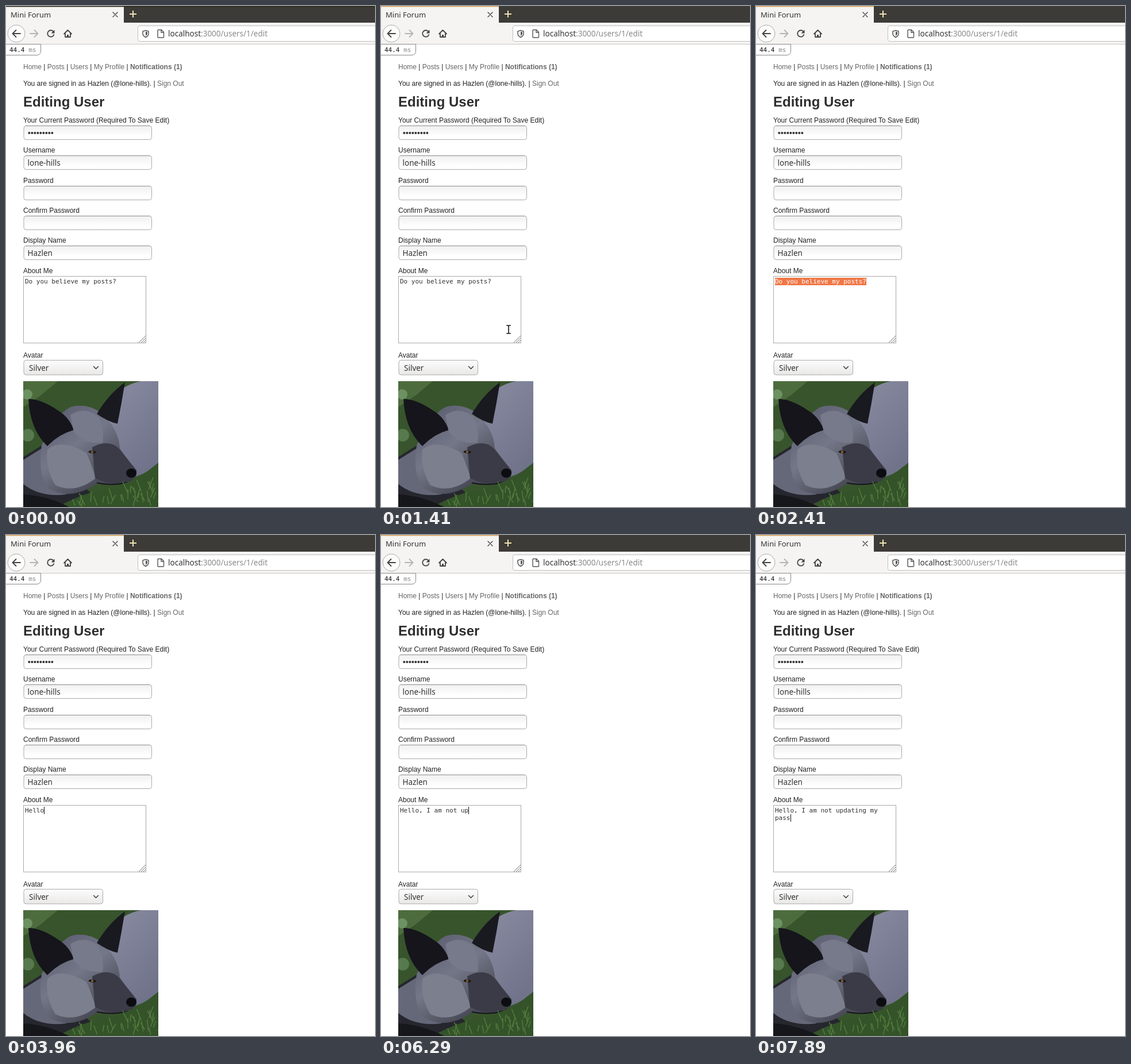
Animation, 642 px wide and 872 px high, one loop 8000 ms. Source, as an HTML page:

```html
<!DOCTYPE html>
<html lang="en">
<head>
<meta charset="utf-8">
<title>Mini Forum</title>
<style>
html, body { margin: 0; width: 100%; height: 100%; overflow: hidden; background: #fff; }
svg { display: block; width: 642px; height: 872px; }
text { white-space: pre; }
.ui { font-family: "Noto Sans", "Open Sans", sans-serif; font-size: 13.5px; fill: #333; }
.page { font-family: "Liberation Sans", Arial, sans-serif; font-size: 12px; fill: #222; }
.mono { font-family: "DejaVu Sans Mono", monospace; font-size: 11px; fill: #333; }
.link { fill: #666; }
.icon { fill: none; stroke: #444; stroke-width: 1.8; stroke-linecap: round; stroke-linejoin: round; }
</style>
</head>
<body>
<svg viewBox="0 0 642 872" xmlns="http://www.w3.org/2000/svg">
<defs>
  <linearGradient id="field" x2="0" y2="1"><stop stop-color="#f0f0f0"/><stop offset=".75" stop-color="#fff"/></linearGradient>
  <linearGradient id="button" x2="0" y2="1"><stop stop-color="#fdfdfd"/><stop offset="1" stop-color="#e9e8e7"/></linearGradient>
  <linearGradient id="body" x2=".6" y2="1"><stop stop-color="#8a8da2"/><stop offset="1" stop-color="#70738a"/></linearGradient>
  <linearGradient id="head" x2=".8" y2="1"><stop stop-color="#55576a"/><stop offset=".45" stop-color="#747788"/><stop offset="1" stop-color="#34353f"/></linearGradient>
  <clipPath id="photo"><path d="M30 653H265V872H30Z"/></clipPath>
</defs>
<rect width="642" height="872" fill="#fff"/>

<!-- browser chrome -->
<rect width="642" height="29" fill="#3c3b37"/>
<rect y="29" width="642" height="37" fill="#f5f4f2"/>
<rect width="205" height="30" fill="#f5f4f2"/>
<rect id="stripe" height="1.500"/>
<path d="M0 66.500H642" stroke="#c9c7c5"/>
<text class="ui" x="8" y="19.500" style="font-size:13px">Mini Forum</text>
<path class="icon" d="M186 11l8 8m0-8l-8 8" style="stroke-width:1.400"/>
<path d="M215 14h12m-6-6v12" stroke="#f3e3b5" stroke-width="2"/>
<circle cx="18" cy="48" r="15" fill="#fcfcfb" stroke="#aaa"/>
<path class="icon" d="M25 48H12m5.500-6L11.500 48l6 6"/>
<path class="icon" d="M42 48h13m-5.500-6l6 6l-6 6" style="stroke:#b5b4b2"/>
<path class="icon" d="M82.500 44.500A5.700 5.700 0 1 0 83.300 50"/>
<path d="M84.500 41.500v6h-6z" fill="#444"/>
<path class="icon" d="M101 48.500l6.500-6.500l6.500 6.500M103 47.500v6.500h9v-6.500"/>
<path d="M106 50h3v4h-3z" fill="#444"/>
<rect x="229.500" y="34.500" width="420" height="27" rx="3" fill="#fff" stroke="#c0bebc"/>
<path d="M243 42.500l5 1.500v4q0 4-5 6.500q-5-2.500-5-6.500v-4z" fill="none" stroke="#555" stroke-width="1.500"/>
<path d="M243 44.500v7.500q3-2 3-4v-2.500z" fill="#555"/>
<path d="M265 41.500h5.500l4 4v8.500q0 1-1 1h-8.500q-1 0-1-1v-11.500q0-1 1-1zM270 42v4h4.500" fill="none" stroke="#555" stroke-width="1.400"/>
<text class="ui" x="282" y="53">localhost<tspan fill="#8a8a8a">:3000/users/1/edit</tspan></text>

<!-- page -->
<path d="M0 66.500H60.500V78q0 7.500-7.500 7.500H0" fill="#fff" stroke="#888"/>
<text class="mono" x="6" y="80" style="fill:#111">44.4 <tspan fill="#888">ms</tspan></text>
<text class="page" x="30" y="110"><tspan class="link">Home</tspan> | <tspan class="link">Posts</tspan> | <tspan class="link">Users</tspan> | <tspan class="link">My Profile</tspan> | <tspan class="link" font-weight="bold">Notifications (1)</tspan></text>
<text class="page" x="30" y="139">You are signed in as Hazlen (@lone-hills). | <tspan class="link">Sign Out</tspan></text>
<text class="page" x="30" y="175" style="font-size:24px;font-weight:bold;fill:#2e2e2e">Editing User</text>
<g id="form"></g>
<text class="page" x="30" y="465">About Me</text>
<rect x="30.500" y="470.500" width="213" height="116" fill="#fff" stroke="#aaa"/>
<path d="M231 586l12-12M235 586l8-8M239 586l4-4" stroke="#777"/>
<rect id="mark" x="33" y="473" width="159" height="13" fill="#f07746"/>
<text class="mono" id="line0" x="33" y="483"></text>
<text class="mono" id="line1" x="33" y="496"></text>
<rect id="caret" width="1" height="13" fill="#111"/>
<text class="page" x="30" y="612">Avatar</text>
<rect x="31" y="616.500" width="137.500" height="25.500" rx="4" fill="url(#button)" stroke="#aaa"/>
<text class="ui" x="40" y="634.500">Silver</text>
<path class="icon" d="M152.500 627.500l4 4l4-4" style="stroke-width:1.600"/>

<!-- fox picture in flat shapes -->
<g clip-path="url(#photo)">
  <rect x="30" y="653" width="235" height="219" fill="#38542c"/>
  <path d="M30 653h60l-30 25l-30 20z" fill="#4d6c3d"/>
  <circle cx="37" cy="676" r="9" fill="#6c9162"/>
  <circle cx="38" cy="747" r="11" fill="#57794e"/>
  <path d="M172 690Q205 658 235 653H265V795Q244 815 222 820L185 800Z" fill="url(#body)"/>
  <path d="M30 785L62 765L150 850L110 872H30Z" fill="#25262e"/>
  <path d="M30 790L75 762L120 800L105 850Q60 856 30 832Z" fill="#656878"/>
  <path d="M62 765Q82 715 112 698Q140 690 165 708Q196 735 198 770Q215 795 227 810Q228 824 210 829Q180 835 158 832Q110 862 75 840Q54 815 62 765Z" fill="url(#head)"/>
  <path d="M72 772Q95 752 140 778Q150 800 156 822Q120 850 86 834Q68 806 72 772Z" fill="#7c7f8e"/>
  <path d="M150 768Q180 752 198 772L227 808Q228 825 208 830Q180 834 155 822Z" fill="#3a3b46"/>
  <path d="M39 684Q62 684 92 705Q110 716 118 738Q92 745 72 766Q42 738 39 684Z" fill="#15151b"/>
  <path d="M207 655Q201 692 194 727Q178 724 158 710Q178 676 207 655Z" fill="#191920"/>
  <path d="M112 712Q135 696 160 714Q172 735 168 760Q140 764 118 742Z" fill="#777a8a"/>
  <path d="M143 776q7-6 14 1q-7 4-14-1z" fill="#0e0e12"/>
  <circle cx="150" cy="776" r="2.500" fill="#76562f"/>
  <ellipse cx="218" cy="813" rx="9" ry="8" fill="#0d0d11"/>
  <path d="M158 830Q185 836 212 829" fill="none" stroke="#15151a" stroke-width="2"/>
  <path d="M90 872Q135 846 180 840L230 822L265 795V872Z" fill="#345329"/>
  <path d="M30 850Q70 852 110 872H30Z" fill="#15171a"/>
  <path id="grass" fill="none" stroke="#527b3d" stroke-width="1.500"/>
</g>

<g id="beam" fill="none" stroke-linecap="square">
  <path d="M-3-7h2l1 1l1-1h2M0-6V6M-3 7h2l1-1l1 1h2" stroke="#fff" stroke-width="4"/>
  <path d="M-3-7h2l1 1l1-1h2M0-6V6M-3 7h2l1-1l1 1h2" stroke="#111" stroke-width="1.600"/>
</g>
<path id="arrow" d="M0 0V15l3.500-3.500l2.500 5.500l2.500-1l-2.500-5.500h5z" fill="#111" stroke="#fff"/>
</svg>
<script>
const el = id => document.getElementById(id);
const show = (node, on) => node.setAttribute("visibility", on ? "visible" : "hidden");

const fields = [
  ["Your Current Password (Required To Save Edit)", "*"],
  ["Username", "lone-hills"],
  ["Password", ""],
  ["Confirm Password", ""],
  ["Display Name", "Hazlen"]
];
const dots = y => Array.from({ length: 9 }, (_, i) =>
  `<circle cx="${40.3 + i * 5}" cy="${y}" r="2" fill="#333"/>`).join("");
el("form").innerHTML = fields.map(([label, value], i) => {
  const y = Math.round(203 + i * 52.35);
  return `<text class="page" x="30" y="${y}">${label}</text>
    <rect x="31" y="${y + 5.5}" width="222.500" height="24" rx="4" fill="url(#field)" stroke="#aaa"/>
    <path d="M34 ${y + 5.5}H250" stroke="#8c8c8c"/>` +
    (value === "*" ? dots(y + 18) : `<text class="ui" x="37.500" y="${y + 23}">${value}</text>`);
}).join("");

let seed = 7;
const rand = () => (seed = seed * 16807 % 2147483647) / 2147483647;
el("grass").setAttribute("d", Array.from({ length: 34 }, () => {
  const x = 120 + rand() * 145;
  return `M${x} ${872 - rand() * (x - 110) * 0.25}l${rand() * 20 - 10} ${-8 - rand() * 14}`;
}).join(""));

const LOOP = 8000, FOCUS = 810, CLICK = 1790, SELECT = 1970, TYPE = 3070;
const before = "Do you believe my posts?";
const after = "Hello, I am not updating my pass";
// one time per character of the new text
const keys = [3070, 3220, 3540, 3740, 3960, 4770, 4860, 5110, 5190, 5270, 5350, 5430,
  5590, 5780, 5855, 5930, 6110, 6290, 6390, 6490, 6600, 6700, 6880, 6930, 7040, 7090,
  7310, 7350, 7550, 7660, 7840, 7890];
const moves = [
  [[810, 628, 150], [980, 207, 401], [1040, 207, 401], [1250, 196, 632], [1500, 237, 525], [1630, 237, 525], [1790, 62, 490], [1830, 62, 490]],
  [[2280, 66, 490], [2340, 300, 472], [2410, 614, 494]]
];

function typed(t) {
  if (t < TYPE) return before;
  const text = after.slice(0, keys.filter(k => k <= t).length);
  return t >= 4150 && t < 4540 ? text + " " : text; // stray space, then removed
}

function wrap(text) {
  if (text.length <= 31) return [text, ""];
  const cut = text.lastIndexOf(" ");
  return [text.slice(0, cut), text.slice(cut + 1)];
}

function pointer(t) {
  const path = moves.find(m => t >= m[0][0] && t < m[m.length - 1][0]);
  if (!path) return null;
  const i = path.findIndex(p => p[0] > t);
  const [a, b] = [path[i - 1], path[i]], u = (t - a[0]) / (b[0] - a[0]);
  return [1, 2].map(k => a[k] + (b[k] - a[k]) * u);
}

function draw(t) {
  const focused = t >= FOCUS;
  el("stripe").setAttribute("fill", focused ? "#d9a35f" : "#2a2818");
  el("stripe").setAttribute("width", focused ? 205 : 642);

  const selected = t >= SELECT && t < TYPE;
  const [first, second] = wrap(typed(t));
  el("line0").textContent = first;
  el("line1").textContent = second;
  el("line0").style.fill = selected ? "#fff" : "";
  show(el("mark"), selected);

  const column = (second || first).length;
  el("caret").setAttribute("x", Math.round(33.2 + column * 6.62));
  el("caret").setAttribute("y", second ? 486 : 473);
  show(el("caret"), t >= CLICK && !selected && !(t >= 4150 && t < 4320));

  const at = pointer(t);
  const beam = at && at[0] < 254 && at[1] < 600;
  show(el("beam"), beam);
  show(el("arrow"), at && !beam);
  if (at) for (const id of ["beam", "arrow"])
    el(id).setAttribute("transform", `translate(${at.map(Math.round)})`);
}

const start = performance.now();
function tick() {
  draw((performance.now() - start) % LOOP);
  requestAnimationFrame(tick);
}
tick();
</script>
</body>
</html>
```
